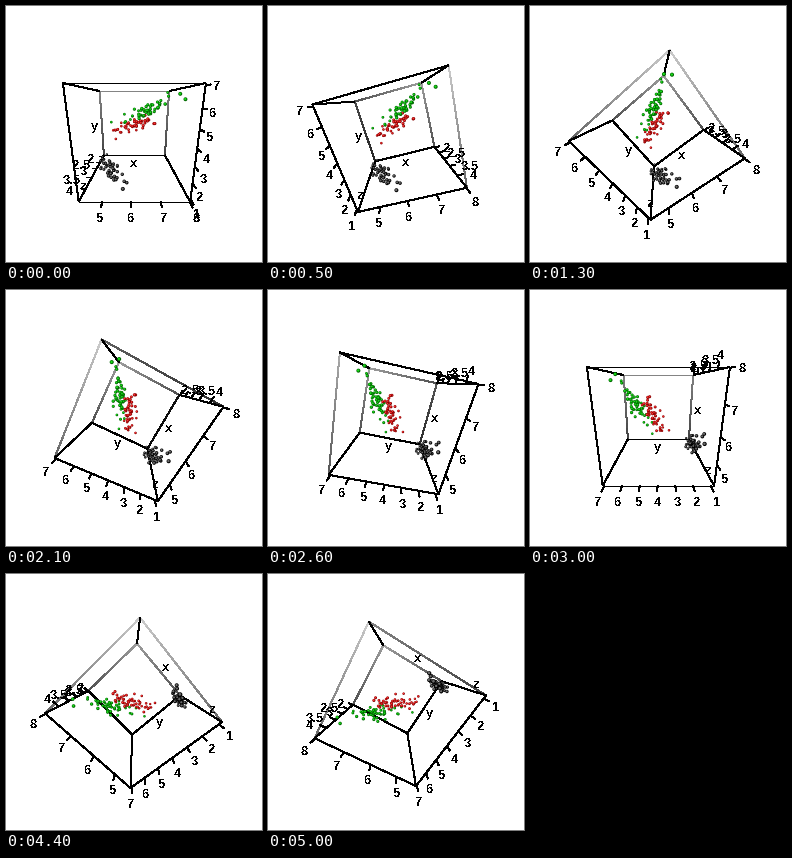
Animation, 256 px wide and 256 px high, one loop 5100 ms. Source, as a matplotlib script:

```python
import numpy as np
import matplotlib.pyplot as plt
from matplotlib.animation import FuncAnimation
from matplotlib.collections import LineCollection

SIZE, DPI = 256, 100
FRAMES, STEP_MS = 51, 100
DEG_PER_FRAME = 3
TILT = np.radians(15)
FOCAL, DIST = 130.3, 3.047
MID = np.array([128.4, 127.6])
PT = 72 / DPI                       # points per pixel

CENTRE = np.array([6.1, 3.95, 3.2])
HALF = np.array([1.92, 3.147, 1.28])
RADIUS = 0.036
MARK = 2 / 15                       # tick length in box units
TITLE = 1.32                        # distance of the axis titles
BASELINE = 7                        # text drop below its anchor, px
GROUP_SIZE = 50

TICKS = [np.arange(5, 9), np.arange(1, 8), np.arange(2, 4.1, 0.5)]

# Each group: rim and core colour, means, spreads, weights of the shared
# factor, and a few outlying points.
GROUPS = [
    ("#000000", "#6b6b6b", (5, 1.46, 3.4), (0.31, 0.17, 0.33), (0.9, 0.3, 0.83),
     [(5.7, 1.5, 4.4), (4.5, 1.3, 2.3), (5.8, 1.2, 4)]),
    ("#850000", "#ff3333", (5.95, 4.28, 2.78), (0.46, 0.42, 0.28), (0.85, 0.9, 0.63),
     [(7, 4.7, 3.2), (5.1, 3, 2.5), (5, 3.5, 2)]),
    ("#006600", "#1adb1a", (6.46, 5.47, 2.97), (0.45, 0.4, 0.3), (0.93, 0.87, 0.48),
     [(7.9, 6.4, 3.8), (7.7, 6.9, 2.6), (7.7, 6.7, 3.8), (7.6, 6.6, 3),
      (7.3, 6.3, 2.9), (4.9, 4.5, 2.5)]),
]


def make_points():
    rng = np.random.default_rng(8)
    points, rims, cores = [], [], []
    for rim, core, mean, spread, weight, outer in GROUPS:
        weight = np.array(weight)
        n = GROUP_SIZE - len(outer)
        shared = np.clip(rng.normal(size=(n, 1)), -1.8, 1.8)
        own = np.clip(rng.normal(size=(n, 3)), -1.8, 1.8)
        noise = weight * shared + np.sqrt(1 - weight ** 2) * own
        points += [outer, np.round(mean + np.array(spread) * noise, 1)]
        rims += [rim] * GROUP_SIZE
        cores += [core] * GROUP_SIZE
    return (np.vstack(points) - CENTRE) / HALF, rims, cores


def to_eye(p, angle):
    x, y, z = np.asarray(p, float).T
    c, s = np.cos(angle), np.sin(angle)
    x, y = c * x - s * y, s * x + c * y
    c, s = np.cos(TILT), np.sin(TILT)
    return np.stack([x, c * y - s * z, s * y + c * z], axis=-1)


def project(p, angle):
    """Screen position and local scale of points in box units."""
    eye = to_eye(p, angle)
    scale = FOCAL / (DIST - eye[..., 2])
    return MID + eye[..., :2] * [1, -1] * scale[..., None], scale


def box_edges():
    for axis in range(3):
        for a in (-1, 1):
            for b in (-1, 1):
                start = np.insert([a, b], axis, -1)
                end = np.insert([a, b], axis, 1)
                yield axis, start, end


def edge_light(axis, start, end, angle):
    """Grey level at both ends of a box edge."""
    if axis == 2:
        return 0, 0
    heights = to_eye([start, end], angle)[:, 1]
    top = heights.max()
    if start[2] > 0:
        side = 1 - axis
        normal = np.zeros(3)
        normal[side] = start[side]
        facing = to_eye([normal], angle)[0, 2]
        if facing <= 0:
            return 0, 0
        glow = 0.8 * np.clip((top - 0.7) / 0.22, 0, 1)
        glow *= np.clip((0.247 - facing) / 0.035, 0, 1)
    else:
        glow = 0.62 * np.clip((top - 0.6) / 0.75, 0, 1)
    return tuple(glow * np.where(heights > top - 0.05, 1, 0.5))


def axis_edges(deg):
    """Fixed coordinates and tick direction of the labelled edges."""
    out = np.array([0, 0, 1])
    near = -1 if deg <= 90 else 1
    side = -1 if deg == 0 else 1
    return (((0, near, 1), out),
            ((-side, 0, 1), out),
            ((side, near, 0), np.array([side, 0, 0])))


points, rims, cores = make_points()
edges = list(box_edges())

fig = plt.figure(figsize=(SIZE / DPI, SIZE / DPI), dpi=DPI, facecolor="white")
ax = fig.add_axes([0, 0, 1, 1])
ax.set_xlim(0, SIZE)
ax.set_ylim(SIZE, 0)
ax.axis("off")

lines = LineCollection([], linewidths=PT, antialiaseds=False, zorder=1)
ax.add_collection(lines)
balls = ax.scatter(np.zeros(2 * len(points)), np.zeros(2 * len(points)),
                   s=1, linewidths=0, zorder=2)


def add_text(word):
    return ax.text(0, 0, word, family="Liberation Sans", weight="bold",
                   size=13 * PT, color="black", ha="center", va="baseline",
                   antialiased=False, zorder=3)


labels = [[add_text(f"{v:g}") for v in values] for values in TICKS]
titles = [add_text(word) for word in "xyz"]
TITLE_AT = -TITLE * (1 - np.eye(3))


def place(text, at, align="center"):
    text.set_position((round(at[0]), round(at[1] + BASELINE)))
    text.set_ha(align)


def draw_box(angle, segments, colors):
    for axis, start, end in edges:
        (a, b), _ = project([start, end], angle)
        g0, g1 = edge_light(axis, start, end, angle)
        parts = 12 if max(g0, g1) > 0 else 1
        for i in range(parts):
            segments.append([a + (b - a) * i / parts,
                             a + (b - a) * (i + 1) / parts])
            g = g0 + (g1 - g0) * (i + 0.5) / parts
            colors.append((g, g, g))


def draw_axes(deg, angle, segments, colors):
    for axis, (base, out) in enumerate(axis_edges(deg)):
        dx, dy, _ = to_eye([out], angle)[0]
        align = "center"
        if abs(dx) > 1.5 * abs(dy):
            align = "left" if dx > 0 else "right"
        for value, text in zip(TICKS[axis], labels[axis]):
            foot = np.array(base, float)
            foot[axis] = (value - CENTRE[axis]) / HALF[axis]
            spots, _ = project([foot, foot + MARK * out, foot + 2 * MARK * out],
                               angle)
            segments.append(spots[:2])
            colors.append((0, 0, 0))
            # left of the box the labels end at the tick
            if align == "left" and spots[2][0] < MID[0]:
                align = "right"
            place(text, spots[2], align)
    spots, _ = project(TITLE_AT, angle)
    for text, at in zip(titles, spots):
        place(text, at)


def draw_balls(angle):
    at, scale = project(points, angle)
    order = np.argsort(scale)
    at, width = at[order], 2 * RADIUS * scale[order] * PT
    balls.set_offsets(np.stack([at, at - 0.2], axis=1).reshape(-1, 2))
    balls.set_sizes(np.stack([width ** 2, (0.58 * width) ** 2], axis=1).ravel())
    balls.set_facecolors([c for i in order for c in (rims[i], cores[i])])


def update(frame):
    deg = frame * DEG_PER_FRAME
    angle = np.radians(deg)
    segments, colors = [], []
    draw_box(angle, segments, colors)
    draw_axes(deg, angle, segments, colors)
    # dark parts go over the light ones where edges meet
    order = sorted(range(len(segments)), key=lambda i: -colors[i][0])
    lines.set_segments([segments[i] for i in order])
    lines.set_color([colors[i] for i in order])
    draw_balls(angle)
    return [lines, balls]


anim = FuncAnimation(fig, update, frames=FRAMES, interval=STEP_MS,
                     init_func=lambda: update(0), repeat=True, repeat_delay=0)
plt.show()
```
